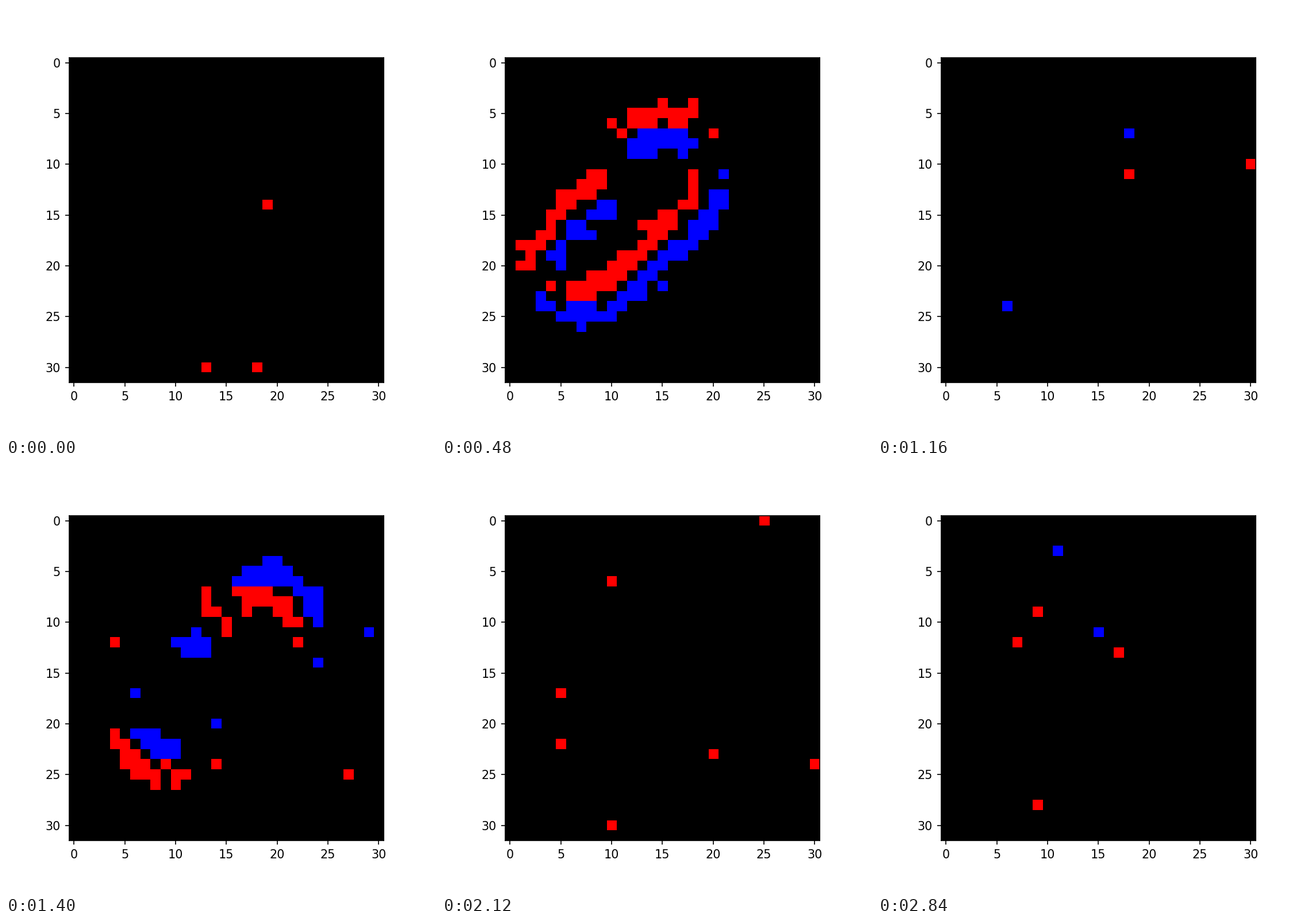
A matplotlib script that plays this animation: 748 px wide and 748 px high, repeating every 2.88 s.

```python
import math

import numpy as np
import matplotlib.pyplot as plt
from matplotlib.animation import FuncAnimation

# Event-camera view of a handwritten zero seen during three saccades.
SIZE, DPI = 748, 149.6
COLS, ROWS = 31, 32
FRAMES, STEP = 72, 40
RED, BLUE = (255, 0, 0), (0, 0, 255)

STROKE = np.array([
    (11.8, 7.6), (13, 6.5), (15, 6.1), (17.3, 6.5), (19.2, 7.9), (20, 10.2),
    (19.3, 13.2), (17, 16), (15.1, 18), (13, 20), (11, 22), (8.5, 23.6),
    (5.5, 23.6), (3.3, 22.3), (2.6, 20.3), (3.8, 18), (5.6, 15.8), (8.3, 13.2),
])
CORNERS = np.array([(-0.9, -3.4), (0.9, 2.8), (5.4, -3.9)])
PEAKS = (460, 1450, 2490)   # time of top speed in each saccade, ms
SPREAD = 180                # duration of a saccade, ms
BLUR = 1.15                 # softness of the pen stroke, cells
LEVEL, SHARP = 0.48, 2.6    # contrast that fires an event, and how abruptly
STRAY_RED, STRAY_BLUE = 4 / 992, 0.5 / 992


def densify(points, n=400):
    k = np.arange(len(points))
    s = np.linspace(0, len(points) - 1, n)
    return np.column_stack([np.interp(s, k, points[:, j]) for j in (0, 1)])


PEN = densify(STROKE)
YY, XX = np.mgrid[0:ROWS, 0:COLS]
CELLS = np.column_stack([XX.ravel(), YY.ravel()]).astype(float)


def motion(t):
    """Offset of the digit and its velocity (1 at top speed)."""
    pos, vel = CORNERS[0].copy(), np.zeros(2)
    for k, peak in enumerate(PEAKS):
        leg = CORNERS[(k + 1) % 3] - CORNERS[k]
        z = (t - peak) / SPREAD
        pos += leg * 0.5 * (1 + math.erf(z / math.sqrt(2)))
        vel += leg / np.hypot(*leg) * math.exp(-z * z / 2)
    return pos, vel


def contrast(t):
    """Brightness change per cell: positive ahead of the stroke."""
    pos, vel = motion(t)
    away = CELLS[:, None] - (PEN + pos)[None]
    dist2 = (away ** 2).sum(axis=2)
    near = dist2.argmin(axis=1)
    row = np.arange(len(CELLS))
    d, d2 = away[row, near], dist2[row, near]
    change = d @ vel / BLUR * np.exp(0.5 - d2 / (2 * BLUR ** 2))
    return change.reshape(ROWS, COLS)


def events(i):
    rng = np.random.default_rng(500 + i)
    change = contrast(i * STEP)
    chance = 1 - np.exp(-(np.abs(change) / LEVEL) ** SHARP)
    fired = rng.random(change.shape) < chance
    stray = rng.random(change.shape)
    img = np.zeros((ROWS, COLS, 3), np.uint8)
    img[stray < STRAY_RED] = RED
    img[stray > 1 - STRAY_BLUE] = BLUE
    img[fired & (change < 0)] = RED
    img[fired & (change > 0)] = BLUE
    return img


fig = plt.figure(figsize=(5, 5), dpi=DPI, facecolor="white")
left, top, cell = 109.5, 89.8, 17.67
width, height = cell * COLS, cell * ROWS
ax = fig.add_axes([left / SIZE, 1 - (top + height) / SIZE,
                   width / SIZE, height / SIZE])
picture = ax.imshow(events(0), interpolation="nearest", aspect="auto")
ax.set_xticks(range(0, COLS, 5))
ax.set_yticks(range(0, ROWS, 5))


def draw(i):
    picture.set_data(events(i))
    return [picture]


anim = FuncAnimation(fig, draw, frames=FRAMES, interval=STEP,
                     init_func=lambda: draw(0), repeat=True, repeat_delay=0)
plt.show()
```
